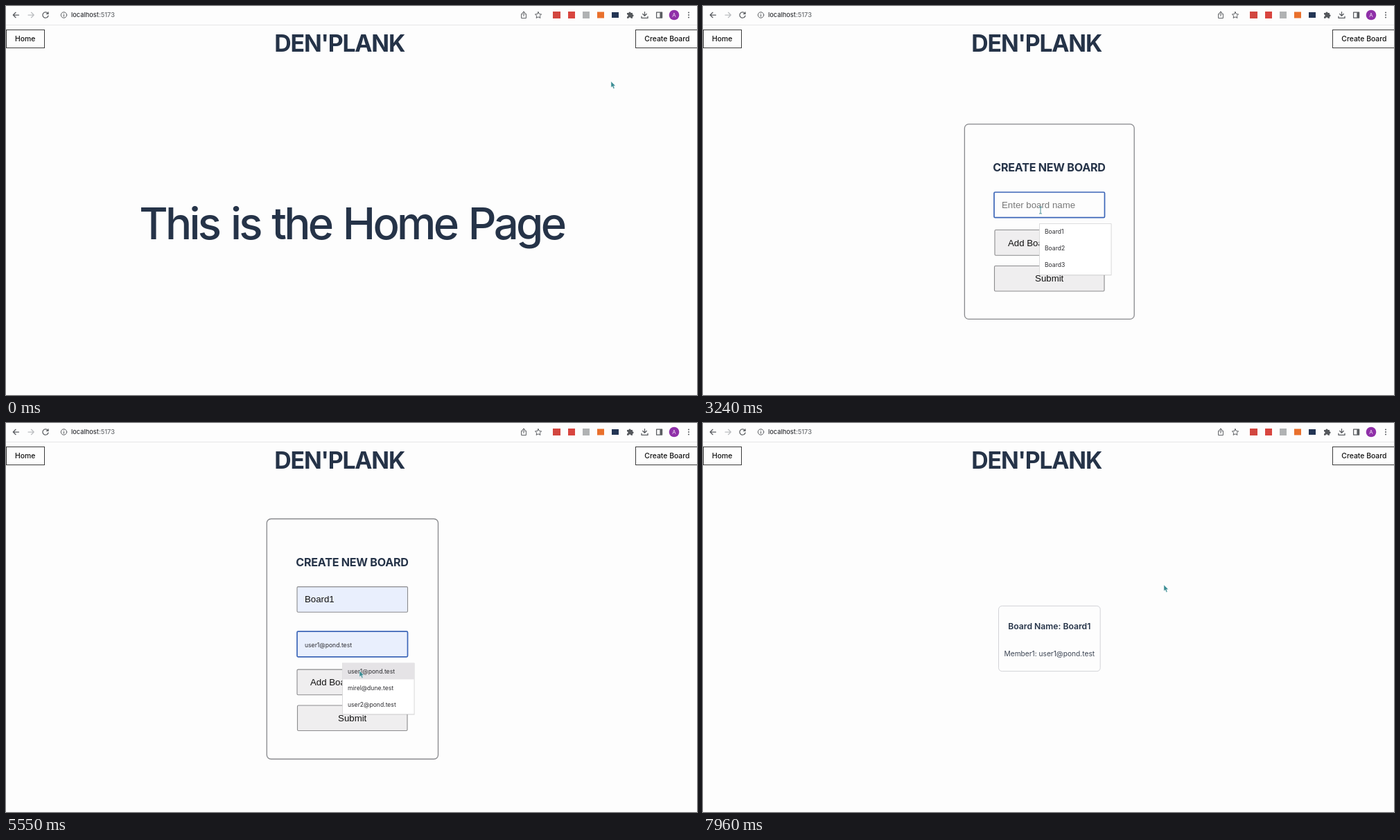
Write an HTML page that moves like this. It is 997 by 562 pixels and loops after 8 s.

```html
<!DOCTYPE html>
<html lang="en">
<head>
<meta charset="utf-8">
<title>Create board</title>
<style>
  html, body { margin: 0; width: 100%; height: 100%; overflow: hidden; background: #fdfdfd; }
  svg { display: block; width: 997px; height: 562px; }
  text { font-family: Inter, "Open Sans", sans-serif; font-optical-sizing: none; fill: #253348; white-space: pre; }
  .mid { text-anchor: middle; }
  .nav { font-size: 10.4px; font-weight: 500; fill: #111; }
  .ctl { font: 13.25px "Liberation Sans", Arial, sans-serif; fill: #111; }
  .hint { font: 13.25px "Liberation Sans", Arial, sans-serif; fill: #777; }
  .peek, .row { font-size: 8.6px; fill: #2c2c30; }
  .icon { fill: none; stroke: #5a5d61; stroke-width: 1.25; stroke-linecap: round; stroke-linejoin: round; }
  .line { fill: #fdfdfd; stroke: #3c3c3c; }
  .box { stroke: #8b8b8d; stroke-width: 1.1; }
  .box.on { stroke: #3c66b8; stroke-width: 1.7; }
  #cursor path { fill: #3b8d94; stroke: #dbe9ea; stroke-width: .5; }
</style>
</head>
<body>
<svg viewBox="0 0 997 562">
  <rect width="997" height="562" fill="#fdfdfd"/>
  <path d="M0 27.5H997" stroke="#e7e7e8"/>

  <g class="icon">
    <path d="M18.5 13H10.5M14 9.3 10.3 13 14 16.7"/>
    <path d="M32 13H40M36.5 9.3 40.2 13 36.5 16.7" stroke="#bcbec1"/>
    <path d="M60.3 10.6A4.1 4.1 0 1 0 61 14M61 8.8V11.4H58.4"/>
    <g stroke-width="1"><circle cx="83.5" cy="13" r="4.2"/><path d="M83.5 12.6V15.2M83.5 10.8V10.9"/></g>
    <g stroke-width="1"><path d="M745.4 11.3H743.6V17.6H750.4V11.3H748.6M747 14.5V8.2M745 10 747 8 749 10"/>
    <path d="M768 8.6 769.4 11.6 772.6 12 770.2 14.2 770.9 17.4 768 15.8 765.1 17.4 765.8 14.2 763.4 12 766.6 11.6Z"/></g>
    <path d="M921.5 8.5V14M918.7 11.5 921.5 14.3 924.3 11.5M917 15V17.4H926V15"/>
    <rect x="938.6" y="9" width="8" height="8"/>
    <path d="M944.9 9V17" stroke-width="3" stroke-linecap="butt"/>
  </g>
  <g>
    <rect x="789" y="8" width="11" height="10" fill="#d2463f"/>
    <rect x="811" y="8" width="10" height="10" fill="#d8453f"/>
    <rect x="832" y="8" width="10" height="10" fill="#b0b2b3"/>
    <rect x="853" y="8.5" width="10" height="9" fill="#e9702c"/>
    <rect x="874" y="9" width="10" height="8" fill="#233554"/>
  </g>
  <path d="M896 10H898.4A1.6 1.6 0 1 1 901.6 10H904V12.2A1.6 1.6 0 1 1 904 15.4V17.8H901.6A1.6 1.6 0 0 0 898.4 17.8H896V15.4A1.6 1.6 0 0 0 896 12.2Z" fill="#55585c"/>
  <circle cx="964" cy="13" r="7.3" fill="#8f30a8"/>
  <text class="mid" x="964" y="15.8" style="font-size:7.8px;fill:#f3e6f6">A</text>
  <g fill="#5a5d61"><circle cx="985" cy="9.5" r="1"/><circle cx="985" cy="13" r="1"/><circle cx="985" cy="16.5" r="1"/></g>
  <text x="94" y="16.4" style="font-size:9.2px;font-weight:500;fill:#2e3034">localhost<tspan fill="#6a6d71">:5173</tspan></text>

  <rect class="line" x=".5" y="34.5" width="55" height="26"/>
  <text class="nav" x="13" y="51.2">Home</text>
  <rect id="create" class="line" x="908.5" y="34.5" width="89" height="26"/>
  <text class="nav" x="921.3" y="51.2">Create Board</text>
  <text class="mid" x="481.2" y="65.5" style="font-size:33.8px;font-weight:700;letter-spacing:-1.2px">DEN'PLANK</text>

  <text id="home" x="192.3" y="337" style="font-size:63.5px;font-weight:450;letter-spacing:-3.7px;word-spacing:3.3px">This is the Home Page</text>

  <g id="form">
    <rect id="panel" rx="6" fill="#fdfdfd" stroke="#87888c" stroke-width="1.3"/>
    <g id="upper">
      <text class="mid" x="499.5" y="239.4" style="font-size:16.1px;font-weight:700;letter-spacing:-.25px">CREATE NEW BOARD</text>
      <rect id="nameBox" class="box" x="420" y="269" width="159.5" height="36.7" rx="1.5"/>
      <text id="nameText" x="431" y="291.9"></text>
    </g>
    <g id="mail">
      <rect id="mailBox" class="box" x="420" y="301.2" width="159.5" height="36.6" rx="1.5"/>
      <text id="mailText" x="431" y="324.2"></text>
    </g>
    <g id="add">
      <rect id="addBox" class="box" x="421" y="323.5" width="159.5" height="36.7" rx="1.5"/>
      <text class="ctl mid" x="500.7" y="346.5">Add Board Members</text>
    </g>
    <g id="submit">
      <rect id="sendBox" class="box" x="420.5" y="375.5" width="158.5" height="36.5" rx="1.5"/>
      <text class="ctl mid" x="499.7" y="398.3">Submit</text>
    </g>
    <path id="caret" stroke="#222" stroke-width="1"/>
    <g id="list">
      <rect x="-.5" y="0" width="104.5" height="75" fill="#000" opacity=".07"/>
      <rect width="103.5" height="73.8" fill="#fff" stroke="#d6d6d8" stroke-width=".8"/>
      <rect id="hot" width="103.5" height="23.4" fill="#e5e3e6"/>
      <text class="row" x="7.5" y="14.7"></text>
      <text class="row" x="7.5" y="38.7"></text>
      <text class="row" x="7.5" y="62.7"></text>
    </g>
  </g>

  <g id="result">
    <rect x="426.5" y="264.3" width="146.7" height="94.4" rx="5" fill="#fdfdfd" stroke="#d2d3d7"/>
    <text class="mid" x="499.8" y="297.8" style="font-size:12.2px;font-weight:600">Board Name: Board1</text>
    <text class="mid" x="499.8" y="337.4" style="font-size:10.2px;fill:#3a4352">Member1: user1@pond.test</text>
  </g>

  <g id="cursor">
    <path id="arrow" d="M0 0V8.6L2 7 3.5 10.4 5 9.7 3.6 6.5 6.2 6.2Z"/>
    <path id="hand" d="M2 .8Q3.2 0 3.8 1.2V4L7 4.6Q8.2 5 8 6.4L7 9.6H3L.4 6Q.2 4.8 2 5.4Z"/>
    <path id="beam" d="M-2-5Q0-5 0-4 0-5 2-5M0-4V4M-2 5Q0 5 0 4 0 5 2 5" style="fill:none;stroke:#5d9ca2;stroke-width:1.1"/>
  </g>
</svg>
<script>
const LOOP = 8000;
const $ = id => document.getElementById(id);
const BOARDS = ["Board1", "Board2", "Board3"];
const MAILS = ["user1@pond.test", "mirel@dune.test", "user2@pond.test"];
const IDLE = "#efeeef", HOVER = "#e3e2e3", PRESS = "#f4f4f5";
const NAME_HINT = ["hint", "Enter board name"], MAIL_HINT = ["hint", "Enter member email"];

// time, pointer x, pointer y, what else changes
const steps = [
  [0, 873, 109, { view: "home", shape: "arrow", focus: "", list: "", hot: false, grown: false, caret: false,
                  add: IDLE, send: IDLE, name: NAME_HINT, mail: MAIL_HINT }],
  [1020, 882, 96], [1180, 902, 70], [1340, 928, 38], [1500, 945, 22],
  [1650, 949, 40, { shape: "hand" }],
  [1810, 947.5, 47, { focus: "create" }],
  [2060, 947.5, 47, { view: "form" }],
  [2180, 915, 62, { shape: "arrow" }],
  [2310, 800, 115], [2450, 660, 185], [2580, 545, 244],
  [2720, 485, 277, { shape: "beam" }],
  [2840, 485, 277, { focus: "name", list: "name" }],
  [3240, 487, 295],
  [3380, 492, 320, { shape: "arrow", hot: true, name: ["peek", BOARDS[0]] }],
  [3510, 493, 324],
  [3650, 493, 328, { list: "", hot: false, name: ["ctl", BOARDS[0]], caret: true, add: HOVER }],
  [3780, 493, 339],
  [3920, 493, 347, { caret: false }],
  [4210, 493, 347, { caret: true }],
  [4330, 493, 347, { grown: true, focus: "", caret: false, add: IDLE }],
  [4720, 497, 340],
  [4860, 502, 327, { shape: "beam" }],
  [5010, 504, 322, { focus: "mail", list: "mail" }],
  [5430, 507, 333],
  [5550, 510, 358, { shape: "arrow", hot: true, mail: ["peek", MAILS[0]] }],
  [5700, 510, 360, { list: "", hot: false, mail: ["ctl", MAILS[0]], caret: true, add: HOVER }],
  [5870, 507, 370], [6030, 502, 386],
  [6200, 497, 401, { add: IDLE, caret: false }],
  [6370, 493, 412, { send: HOVER }],
  [6520, 490, 417, { caret: true }],
  [6650, 488, 420],
  [6790, 486, 421, { caret: false }],
  [7080, 486, 421, { send: PRESS, focus: "" }],
  [7230, 486, 421, { view: "result" }],
  [7530, 510, 397], [7670, 568, 336], [7820, 631, 269], [7960, 665, 234]
];

let last = {};
const scenes = steps.map(([at, x, y, change]) => last = { ...last, ...change, at, x, y });

const set = (id, attrs) => { for (const k in attrs) $(id).setAttribute(k, attrs[k]); };
const show = (id, on) => { $(id).style.display = on ? "" : "none"; };
const move = (id, x, y) => set(id, { transform: `translate(${x} ${y})` });

function field(id, [kind, value], focused) {
  set(id + "Text", { class: kind });
  $(id + "Text").textContent = value;
  set(id + "Box", { class: focused ? "box on" : "box", fill: kind === "hint" ? "#fdfdfd" : "#e9effd" });
}

function draw(s) {
  for (const v of ["home", "form", "result"]) show(v, s.view === v);
  for (const c of ["arrow", "hand", "beam"]) show(c, s.shape === c);
  move("cursor", s.x, s.y);

  const lit = s.focus === "create";
  set("create", { style: lit ? "stroke:#3d70c4;stroke-width:1.8" : "", rx: lit ? 1.5 : 0 });

  set("panel", s.grown ? { x: 376.3, y: 138.5, width: 247.2, height: 347 }
                       : { x: 377.4, y: 170.6, width: 244.8, height: 281.8 });
  move("upper", 0, s.grown ? -32.4 : 0);
  move("add", s.grown ? -1 : 0, s.grown ? 32.6 : 0);
  move("submit", 0, s.grown ? 32.5 : 0);
  show("mail", s.grown);
  field("name", s.name, s.focus === "name");
  field("mail", s.mail, s.focus === "mail");
  set("addBox", { fill: s.add });
  set("sendBox", { fill: s.send });

  show("caret", s.caret);
  set("caret", { d: s.grown ? "M533.6 311.5V327" : "M473.8 279.5V295" });

  show("list", s.list);
  show("hot", s.hot);
  move("list", 485.5, s.list === "mail" ? 347 : 314.6);
  const rows = s.list === "mail" ? MAILS : BOARDS;
  document.querySelectorAll(".row").forEach((r, i) => r.textContent = rows[i]);
}

let shown;
function tick() {
  const t = performance.now() % LOOP;
  const scene = scenes.filter(s => s.at <= t).pop();
  if (scene !== shown) draw(shown = scene);
  requestAnimationFrame(tick);
}
tick();
</script>
</body>
</html>
```
